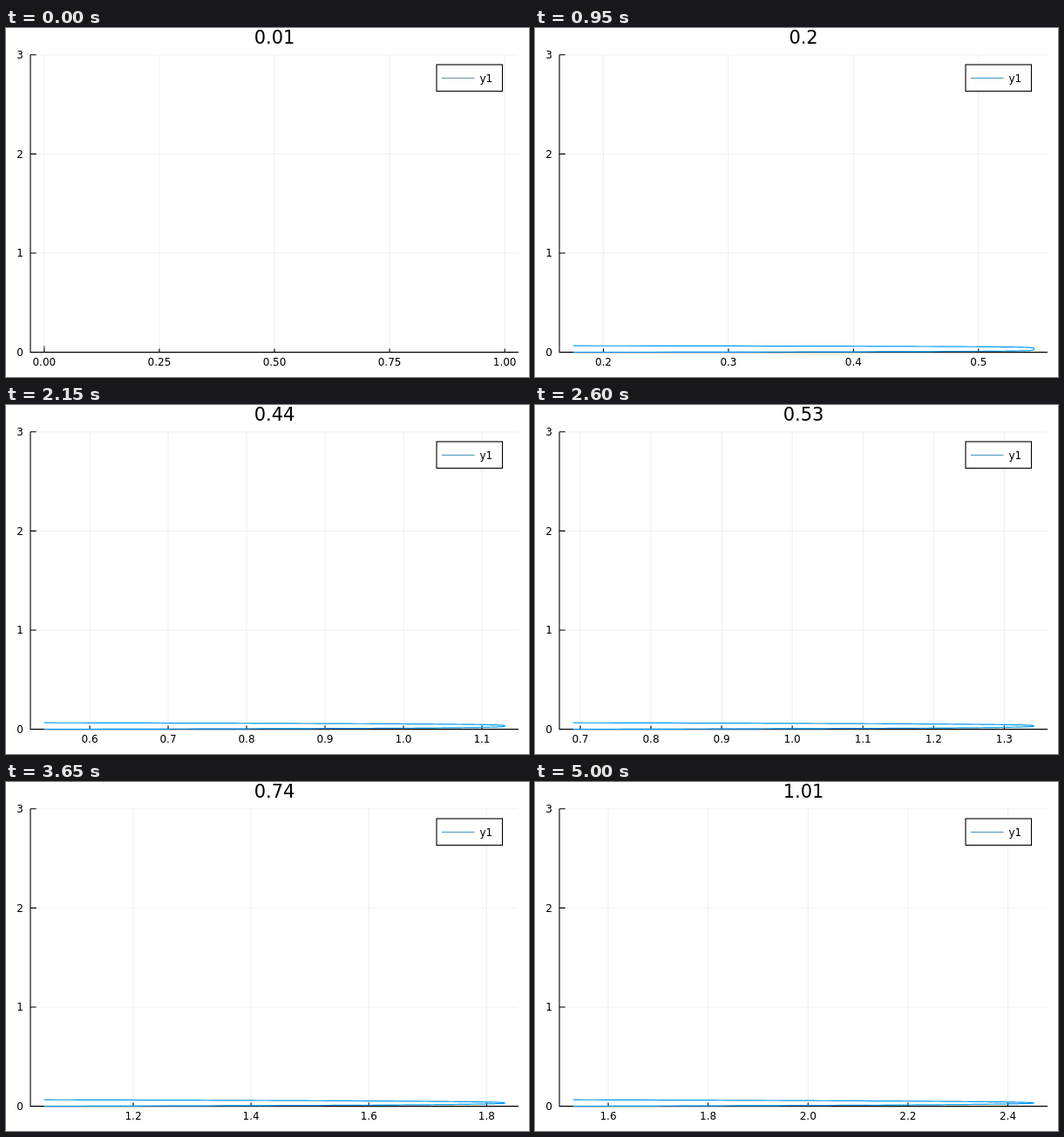
Recreate the animation shown at these times as an HTML page. Size 600 px wide and 400 px high, loop 5050 ms.

```html
<!DOCTYPE html>
<html lang="en">
<head>
<meta charset="utf-8">
<title>Profile over time</title>
<style>
  html, body { margin: 0; width: 100%; height: 100%; overflow: hidden; background: #fff; }
  svg { display: block; width: 600px; height: 400px; }
  text { font: 12px "DejaVu Sans", sans-serif; fill: #000; }
  .title { font-size: 20.9px; }
  .mid { text-anchor: middle; }
  .end { text-anchor: end; }
  .axis { stroke: #000; stroke-width: 1.1; fill: none; }
  .grid { stroke: #000; stroke-opacity: .065; fill: none; }
</style>
</head>
<body>
<svg viewBox="0 0 600 400">
  <clipPath id="area"><rect x="28" y="31" width="560" height="341"/></clipPath>
  <rect width="600" height="400" fill="#fff"/>
  <path id="grid" class="grid"/>
  <path id="axes" class="axis"/>
  <g id="yLabels"></g>
  <g id="xLabels"></g>
  <path id="curve" fill="none" stroke-width="1.2" stroke-linejoin="round" clip-path="url(#area)"/>
  <rect x="494" y="42" width="75.5" height="30.4" fill="#fff" stroke="#000" stroke-width="1.1"/>
  <path id="key" d="M500 57.4H537.5" stroke-width="1"/>
  <text x="543.5" y="61.7">y1</text>
  <text id="title" class="title mid" x="308" y="18.4"></text>
</svg>
<script>
const STEP = 50, COUNT = 101;
const L = 28, R = 588, T = 30.8, B = 371.6, TOP = 364.2;
const $ = id => document.getElementById(id);
const yOf = v => B - v * (B - T) / 3;
const label = (x, y, s, cls) => `<text class="${cls}" x="${x.toFixed(2)}" y="${y.toFixed(2)}">${s}</text>`;

// Smallest and largest x of the profile after time s
function extent(s) {
  const a = 0.0875;
  const spread = Math.sqrt(a * a + (1.063 - 0.052 * s) * s) - a;
  const mid = 2 * s - 0.0518 * Math.sqrt(s) + 0.0068 * s + 0.0358 * s * s;
  return [Math.max(0, mid - spread / 2), mid + spread / 2];
}

// Pick the tick step with the best mix of count, coverage and roundness
function ticks(lo, hi) {
  const span = hi - lo, z = Math.floor(Math.log10(span));
  const steps = [[1, 1, 0], [5, .9, 0], [2, .7, 0], [2.5, .5, 1], [3, .2, 0]];
  let best = { score: -Infinity };
  for (let e = z; e >= z - 1; e--) {
    for (const [q, nice, extra] of steps) {
      const step = q * 10 ** e;
      const first = Math.ceil(lo / step), last = Math.floor(hi / step);
      const n = last - first + 1;
      if (n < 4 || n > 8) continue;
      const zero = first <= 0 && last >= 0 ? 1 : 0;
      const score = (1 - Math.abs(n - 5) / 5) / 4 + zero / 6 +
        span / (2 * (n - 1) * step) + nice / 4 - n * 1e-6;
      if (score > best.score) best = { score, step, first, n, digits: Math.max(0, extra - e) };
    }
  }
  return Array.from({ length: best.n }, (_, i) => {
    const v = (best.first + i) * best.step;
    return { v, s: Math.abs(v).toFixed(best.digits) };
  });
}

function profile(s, x0, x1, xOf) {
  const power = s ? Math.min(20, 1.5 + 0.85 / s) : 2;
  const pts = [];
  for (let i = 0; i <= 200; i++) {
    const v = i / 200;
    const x = x0 + (x1 - x0) * (1 - Math.abs(2 * v - 1) ** power);
    pts.push(xOf(x).toFixed(2) + " " + (B + (TOP - B) * v).toFixed(2));
  }
  return "M" + pts.join("L");
}

function draw(n) {
  const s = n * 0.01;
  const [x0, x1] = n ? extent(s) : [0, 0];
  const pad = 0.03 * (n ? x1 - x0 : 1);
  const lo = x0 - pad, hi = (n ? x1 : 1) + pad;
  const xOf = v => L + (R - L) * (v - lo) / (hi - lo);

  let grid = "", axes = `M${L} ${T}V${B}H${R}`, names = "";
  for (let v = 0; v <= 3; v++) {
    grid += `M${L} ${yOf(v)}H${R}`;
    axes += `M${L} ${yOf(v)}h6.7`;
  }
  for (const t of ticks(lo, hi)) {
    const x = xOf(t.v);
    grid += `M${x} ${T}V${B}`;
    axes += `M${x} ${B}v-4.1`;
    names += label(x, 387, t.s, "mid");
  }
  $("grid").setAttribute("d", grid);
  $("axes").setAttribute("d", axes);
  $("xLabels").innerHTML = names;

  $("curve").setAttribute("d", profile(s, x0, x1, xOf));
  $("curve").setAttribute("stroke", n ? "#009afa" : "#4a5c66");
  $("key").setAttribute("stroke", n ? "#3f8fb9" : "#66899a");

  const time = (n + 1) * 0.01;
  $("title").textContent = Number.isInteger(time) ? time.toFixed(1) : String(time);
}

$("yLabels").innerHTML = [0, 1, 2, 3].map(v => label(20, yOf(v) + 4.4, v, "end")).join("");

let shown = -1;
const start = performance.now();
function tick() {
  const n = Math.floor((performance.now() - start) / STEP) % COUNT;
  if (n !== shown) draw(shown = n);
  requestAnimationFrame(tick);
}
tick();
</script>
</body>
</html>
```
